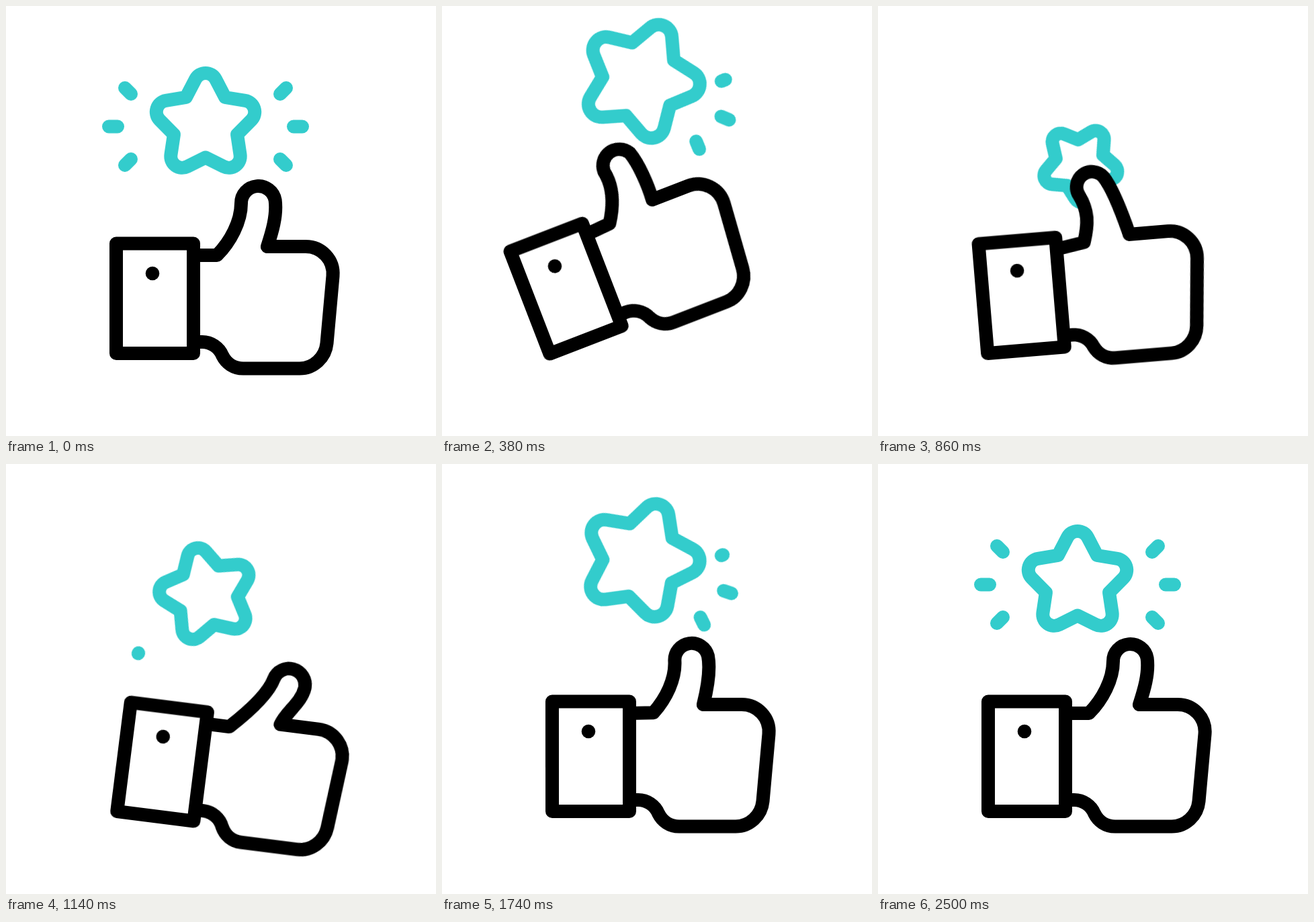
Write an HTML page that moves like this. It is 640x640 px and loops after 2820 ms.

```html
<!DOCTYPE html>
<html lang="en">
<head>
<meta charset="utf-8">
<title>Thumbs up</title>
<style>
  html, body { margin: 0; width: 100%; height: 100%; overflow: hidden; background: #fff; }
  svg { display: block; width: 100%; height: 100%; }
  svg * { stroke-width: 20; stroke-linecap: round; stroke-linejoin: round; }

  .hand { fill: #fff; stroke: #000; transform-origin: 164px 527px; }
  .plain { stroke: none; }
  .button { fill: #000; stroke: none; }
  .float { fill: none; stroke: #33cccc; transform: translate(297px, 176px); }
  #star { vector-effect: non-scaling-stroke; }
  #dashes line { stroke-dasharray: 100 200; }

  .hand, .float, #star {
    --up: cubic-bezier(.33, 0, .46, 1);
    --back: cubic-bezier(.4, 0, .8, 1);
    animation: 2820ms cubic-bezier(.333, 0, .667, 1) infinite;
  }
  .hand { animation-name: swing; }
  .float { animation-name: toss; }
  #star { animation-name: grow; }

  @keyframes swing {
    0% { transform: rotate(0deg); }
    15.6%, 22.7% { transform: rotate(-22.2deg); }
    37.06% { transform: rotate(8.5deg); }
    54.25% { transform: rotate(-4.1deg); }
    67.02% { transform: rotate(2.4deg); }
    81.56% { transform: rotate(-1deg); }
    88.65%, 100% { transform: rotate(0deg); }
  }

  @keyframes toss {
    0% { transform: translate(297px, 176px) rotate(0deg); animation-timing-function: var(--up); }
    16.67% { transform: translate(296px, 109px) rotate(23.3deg); animation-timing-function: var(--up); }
    35.1% { transform: translate(301px, 241px) rotate(-43deg); animation-timing-function: var(--back); }
    55.5% { transform: translate(296px, 134px) rotate(24deg); }
    76.24%, 100% { transform: translate(297px, 176px) rotate(0deg); }
  }

  @keyframes grow {
    0% { transform: scale(1); animation-timing-function: var(--up); }
    16.67% { transform: scale(1.16); animation-timing-function: var(--up); }
    35.1% { transform: scale(.73); animation-timing-function: var(--back); }
    55.5% { transform: scale(1.19); }
    76.24%, 100% { transform: scale(1); }
  }
</style>
</head>
<body>
<svg viewBox="0 0 640 640">
  <g class="float">
    <g id="dashes"></g>
    <path id="star"/>
  </g>
  <g class="hand">
    <path class="plain" d="M279 371 H389 V500 H279 Z"/>
    <path d="M389 358 H446 C470 358 488.5 378 486.5 402 L477.5 502 C475.5 523 458 539.5 437 539.5 H353 C339 539.5 328 532 322 520 C317 508 305 500 292 500 H279"/>
    <path id="thumb"/>
    <rect x="164" y="353.5" width="115" height="163.5"/>
    <circle class="button" cx="218" cy="398" r="10.3"/>
  </g>
</svg>
<script>
  const LOOP = 2820;
  const byId = id => document.getElementById(id);
  const rad = deg => deg * Math.PI / 180;
  const spin = (x, y, deg) => {
    const c = Math.cos(rad(deg)), s = Math.sin(rad(deg));
    return [x * c - y * s, x * s + y * c];
  };
  const loop = (el, frames, easing = 'linear') => el.animate(
    frames.map(([ms, style]) => ({ offset: ms / LOOP, easing, ...style })),
    { duration: LOOP, iterations: Infinity }
  );

  // Five rounded tips, each followed by the notch to its right.
  function starPath() {
    let d = '';
    for (let i = 0; i < 5; i++) {
      const at = (x, y) => spin(x, y, i * 72);
      d += `${i ? 'L' : 'M'}${at(-15.1, -66.9)} A17 17 0 0 1 ${at(15.1, -66.9)} L${at(29.1, -40)} `;
    }
    return d + 'Z';
  }

  // The tip turns about the thumb's root, growing longer and thinner as it bends.
  function thumbPath(bend) {
    const size = Math.abs(bend), left = Math.min(bend, 0);
    const r = 25.5 - 0.1 * size, long = 0.28 * size;
    const tip = (x, y) => {
      const [dx, dy] = spin(23.5 + 0.31 * long + x, -71.5 - 0.95 * long + y, bend);
      return [352 + dx, 365 + dy];
    };
    const from = (x, y, length, deg) => {
      const [dx, dy] = spin(0, -length, deg);
      return [x + dx, y + dy];
    };
    const root = [314 - 0.25 * left, 371 + 0.25 * left];
    const [cx, cy] = spin(r, 0, -10);
    return `M279 371 L${root} C${from(...root, 28, 45 + left)} ${tip(-r, 27.5)} ${tip(-r, 0)} ` +
      `A${r} ${r} 0 0 1 ${tip(cx, cy)} C${tip(cx + 3, cy + 23)} ${from(389, 358, 21.5, 18 + 1.2 * left)} 389 358`;
  }

  byId('star').setAttribute('d', starPath());
  byId('thumb').setAttribute('d', thumbPath(0));
  const bends = [[0, 0], [860, -27], [1140, 14], [1480, -7], [1980, 0], [LOOP, 0]];
  loop(byId('thumb'), bends.map(([ms, bend]) => [ms, { d: `path("${thumbPath(bend)}")` }]),
    'cubic-bezier(.333, 0, .667, 1)');

  // Clockwise from the lower left; each stroke flows inwards, one dash period being 300.
  for (let i = 0; i < 6; i++) {
    const side = i < 3 ? -1 : 1;
    const row = i < 3 ? 1 - i : i - 4;
    const [outer, inner] = row ? [120, 111] : [144, 131];
    const line = document.createElementNS('http://www.w3.org/2000/svg', 'line');
    const attrs = {
      x1: side * outer, y1: 3.5 + 57.5 * row,
      x2: side * inner, y2: 3.5 + 48.5 * row,
      pathLength: 100
    };
    for (const name in attrs) line.setAttribute(name, attrs[name]);
    byId('dashes').append(line);

    const starts = [100 + 72 * i, 1125 + 78 * i, 1335 + 100 * i, 1820 + 300 * (i / 5) ** 0.4];
    const flow = (ms, v) => [ms, { strokeDashoffset: `${-v}px` }];
    const frames = [flow(0, 0)];
    starts.forEach((ms, k) => {
      const from = 150 * k + (k % 2 ? 45 : 0);
      frames.push(flow(ms, from), flow(ms + 140, from + 105));
    });
    loop(line, [...frames, flow(LOOP, 600)]);
  }
</script>
</body>
</html>
```
